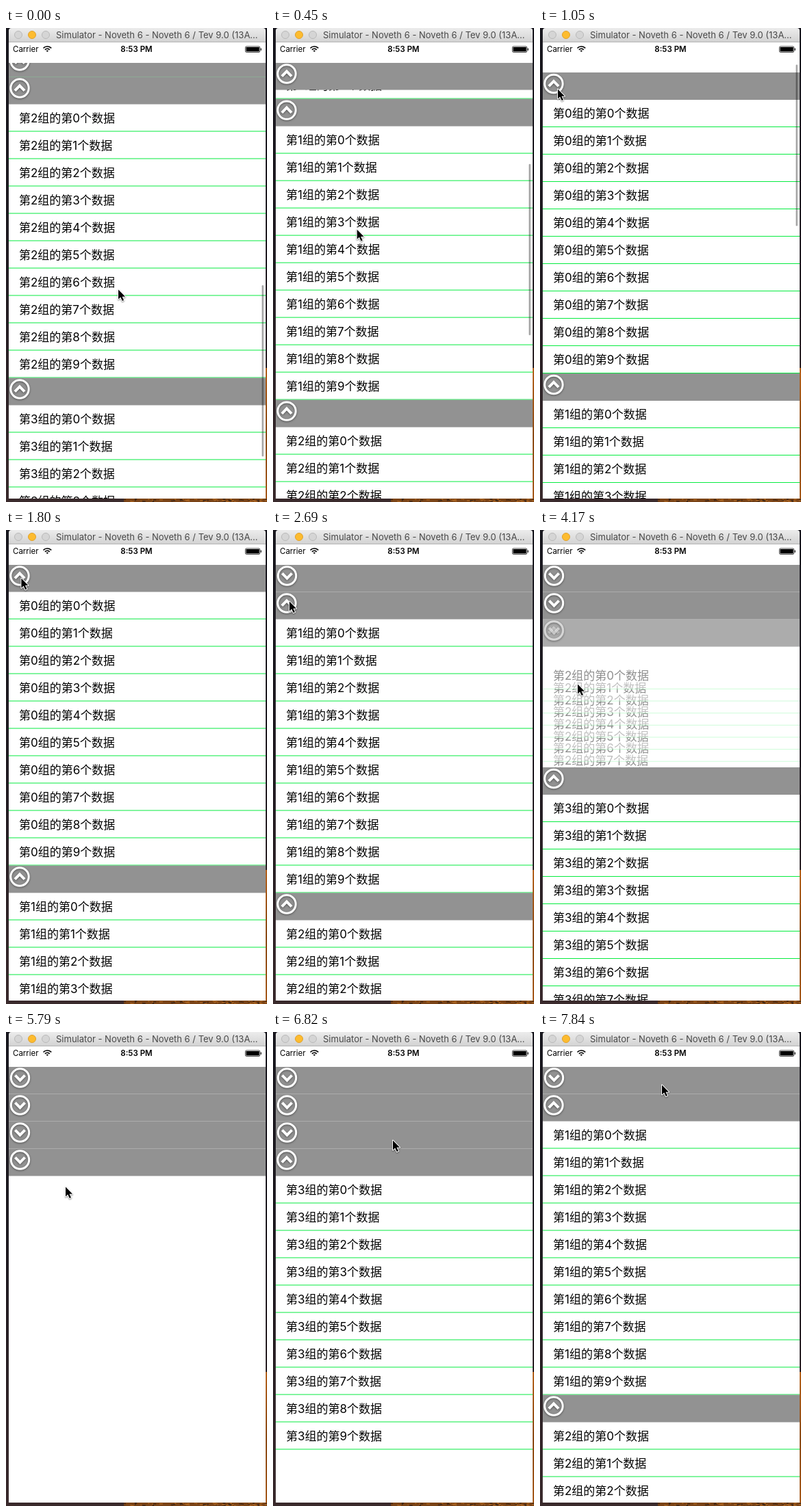
These frames come from a looping animation (381x693 px, 8000 ms). An HTML page with a canvas:

```html
<!DOCTYPE html>
<html lang="zh-CN">
<head>
<meta charset="utf-8">
<title>Collapsible list</title>
<style>
html, body { margin: 0; width: 100%; height: 100%; overflow: hidden; background: #1d1a20; }
canvas { display: block; width: 381px; height: 693px; }
</style>
</head>
<body>
<canvas id="stage" width="381" height="693"></canvas>
<script>
const ctx = document.getElementById('stage').getContext('2d');
const LOOP = 8000, W = 381, H = 693;
const LEFT = 4, RIGHT = 379, WIDTH = RIGHT - LEFT, TOP = 50.5, BOTTOM = 688;
const ROW = 40, ROWS = 10, SECTIONS = 4, VIEW = 667;
const FOLD = 300, GLIDE = 896, BOUNCE = 300;
const UI = 'Inter, "Liberation Sans", sans-serif';
const LIST = 'Inter, "Noto Sans CJK SC", "Noto Sans CJK", sans-serif';

// Each tap flips one section
const taps = [
  { at: 2150, section: 0 }, { at: 3060, section: 1 }, { at: 3996.75, section: 2 },
  { at: 5000, section: 3 }, { at: 6085, section: 3 }, { at: 6900, section: 2 },
  { at: 7450, section: 1 }
];

// The pointer rests between moves
const moves = [
  { at: 100, ms: 945, x: 26, y: 89 }, { at: 1240, ms: 700, x: 22, y: 68 },
  { at: 2400, ms: 289, x: 24, y: 104 }, { at: 3400, ms: 320, x: 40, y: 146 },
  { at: 4018, ms: 140, x: 55, y: 225 }, { at: 4500, ms: 500, x: 71, y: 192 },
  { at: 5273, ms: 500, x: 87, y: 226 }, { at: 5800, ms: 400, x: 150, y: 190 },
  { at: 6300, ms: 500, x: 175, y: 158 }, { at: 6940, ms: 300, x: 178, y: 111 },
  { at: 7498, ms: 330, x: 178, y: 77 }
];

const clamp = v => Math.max(0, Math.min(1, v));
const ease = v => (1 - Math.cos(Math.PI * clamp(v))) / 2;

// The screen refreshes about seven times a second
function hold(t) {
  return t < 2690 ? Math.floor(t / 149.4) * 149.4
    : 2690 + Math.floor((t - 2690) / 146.8) * 146.8;
}

function scrollAt(t) {
  const overshoot = Math.sin(Math.PI * clamp((t - GLIDE) / BOUNCE));
  return 859 * (1 - clamp(t / GLIDE)) ** 1.15 - 14.5 * overshoot;
}

function pointerAt(t) {
  let x = 164, y = 382;
  for (const m of moves) {
    const p = ease((t - m.at) / m.ms);
    x += (m.x - x) * p;
    y += (m.y - y) * p;
  }
  return [x, y];
}

function openness(section, t) {
  let open = 1;
  for (const tap of taps) {
    if (tap.section !== section || t < tap.at) continue;
    const p = ease((t - tap.at) / FOLD);
    open = open > 0.5 ? 1 - p : p;
  }
  return open;
}

function rect(x, y, w, h, color) {
  ctx.fillStyle = color;
  ctx.fillRect(x, y, w, h);
}

function text(str, x, y, font, color = '#000', align = 'left') {
  ctx.font = font;
  ctx.fillStyle = color;
  ctx.textAlign = align;
  ctx.fillText(str, x, y);
}

function path(points) {
  ctx.beginPath();
  points.forEach(p => ctx.lineTo(...p));
}

function arc(x, y, r, a0 = 0, a1 = 2 * Math.PI) {
  ctx.beginPath();
  ctx.arc(x, y, r, a0, a1);
}

function stroke(color, width) {
  ctx.strokeStyle = color;
  ctx.lineWidth = width;
  ctx.stroke();
}

function shadow(blur) {
  ctx.shadowColor = 'rgba(0,0,0,.45)';
  ctx.shadowBlur = blur;
  ctx.shadowOffsetY = 1;
}

function vertical(y0, y1, ...colors) {
  const g = ctx.createLinearGradient(0, y0, 0, y1);
  colors.forEach((c, i) => g.addColorStop(i / (colors.length - 1), c));
  return g;
}

function desktop() {
  rect(0, 0, W, H, vertical(0, H, '#19181f', '#211c22', '#3a2a2c'));
  rect(RIGHT, 497, 2, H - 497, vertical(497, H, '#b5621c', '#8a4a16', '#a85a1a'));
  rect(172, BOTTOM, W - 172, H - BOTTOM, '#7a4316');
  let seed = 7;
  const rnd = () => (seed = seed * 16807 % 2147483647) / 2147483647;
  for (let i = 0; i < 90; i++) {
    rect(172 + rnd() * 207, BOTTOM + rnd() * 5, 1 + rnd() * 4, 1.5, rnd() < 0.5 ? '#3d2515' : '#a8621f');
  }
}

function titleBar() {
  ctx.beginPath();
  ctx.roundRect(LEFT, 0, WIDTH, 24, [4, 4, 0, 0]);
  ctx.fillStyle = vertical(0, 20, '#ececec', '#d3d3d3');
  ctx.fill();
  rect(LEFT, 20, WIDTH, 1, '#b4b4b4');
  for (let i = 0; i < 3; i++) {
    arc(18 + 20 * i, 10, 5.5);
    ctx.fillStyle = i === 1 ? '#fdbc2f' : '#d5d5d5';
    ctx.fill();
    stroke(i === 1 ? '#e0a12c' : '#b9b9b9', 1);
  }
  text('Simulator - Noveth 6 - Noveth 6 / Tev 9.0 (13A…', 73, 15, '13px ' + UI, '#484848');
}

function statusBar() {
  rect(LEFT, 21, WIDTH, BOTTOM - 21, '#fff');
  text('Carrier', 10, 35, '11.5px ' + UI);
  text('8:53 PM', 190.5, 35, '600 11.5px ' + UI, '#000', 'center');
  for (const r of [1.2, 4.6, 8]) {
    arc(60.3, 35, r, -Math.PI * 0.76, -Math.PI * 0.24);
    stroke('#000', r < 2 ? 2.4 : 1.7);
  }
  ctx.beginPath();
  ctx.roundRect(349.4, 26.9, 21.4, 8.6, 1.8);
  stroke('#000', 0.7);
  rect(350.5, 28, 19.2, 6.4, '#000');
  rect(371.6, 29.6, 1.2, 3.2, '#000');
}

function row(section, i, y, alpha) {
  ctx.globalAlpha = alpha;
  rect(LEFT, y, WIDTH, ROW, '#fff');
  text(`第${section}组的第${i}个数据`, 19, Math.round(y + 26.5), '17px ' + LIST);
  ctx.globalAlpha = alpha * alpha;
  rect(LEFT, y + ROW - 1, WIDTH, 1, '#06ec40');
  ctx.globalAlpha = 1;
}

function chevron(y, up, alpha) {
  const x = up ? 20 : 20.5, cy = y + 16.5, d = up ? 3.7 : -3.7;
  ctx.save();
  ctx.globalAlpha = alpha;
  shadow(3);
  arc(x, cy, 13.2);
  stroke('#fff', 3);
  path([[x - 7.1, cy + d], [x, cy - d], [x + 7.1, cy + d]]);
  stroke('#fff', 4);
  ctx.restore();
}

// Both states cross-fade while the section folds
function header(y, open) {
  const fades = [open, 1 - open];
  for (const alpha of fades) {
    ctx.globalAlpha = alpha;
    rect(LEFT, y, WIDTH, ROW, '#929292');
  }
  ctx.globalAlpha = 1;
  fades.forEach((alpha, i) => chevron(y, i === 0, alpha));
}

function scrollBar(offset, alpha) {
  const track = VIEW - 6, total = SECTIONS * ROW * (ROWS + 1);
  const top = TOP + 3 + Math.max(0, offset) / total * track;
  const length = track * VIEW / total + Math.min(0, offset);
  ctx.beginPath();
  ctx.roundRect(373.5, top, 2.5, length, 1.25);
  ctx.fillStyle = `rgba(0,0,0,${0.35 * alpha})`;
  ctx.fill();
}

function table(t) {
  const offset = scrollAt(t);
  ctx.save();
  ctx.beginPath();
  ctx.rect(LEFT, 51, WIDTH, BOTTOM - 51);
  ctx.clip();
  let y = TOP - offset;
  for (let s = 0; s < SECTIONS; s++) {
    const open = openness(s, t), next = y + ROW + ROW * ROWS * open;
    // While folding, all rows gather one row below the header
    for (let i = ROWS - 1; i >= 0 && open > 0; i--) {
      row(s, i, y + ROW + ROW * i + (1 - open) * ROW * (1 - i), open);
    }
    header(Math.min(Math.max(y, TOP), next - ROW), open);
    y = next;
  }
  scrollBar(offset, clamp((1800 - t) / 450));
  ctx.restore();
}

function pointer(x, y) {
  ctx.save();
  ctx.translate(x, y + 0.5);
  path([[0, 0], [0, 14], [3.2, 11], [5.8, 16.6], [8, 15.6], [5.5, 10.2], [10, 10.2]]);
  ctx.closePath();
  ctx.lineJoin = 'round';
  shadow(2);
  stroke('#fff', 2);
  ctx.shadowColor = 'transparent';
  ctx.fillStyle = '#000';
  ctx.fill();
  ctx.restore();
}

function draw(t) {
  desktop();
  titleBar();
  statusBar();
  table(t);
  pointer(...pointerAt(t));
}

const begin = performance.now();
function tick() {
  draw(hold((performance.now() - begin) % LOOP));
  requestAnimationFrame(tick);
}
tick();
</script>
</body>
</html>
```
